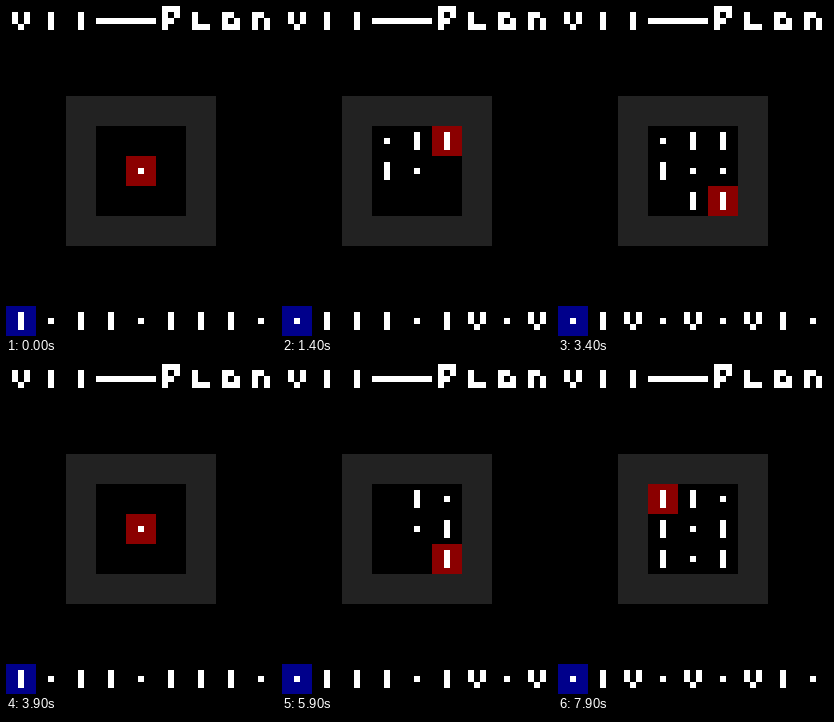
An HTML page with a canvas for the animation above (8400 ms loop, 270x330 px).

```html
<!DOCTYPE html>
<html lang="en">
<head>
<meta charset="utf-8">
<title>VII — Plan</title>
<style>
  html, body { margin: 0; width: 100%; height: 100%; overflow: hidden; background: #000; }
  canvas { display: block; }
</style>
</head>
<body>
<canvas id="stage" width="270" height="330" role="img" aria-label="VII — Plan"></canvas>
<script>
const ctx = document.getElementById('stage').getContext('2d');
const CELL = 30, UNIT = 6, LOOP = 8400;

// Glyph rows inside a 5 x 5 unit cell, from the given top row down
const GLYPHS = {
  '.': [2, '  #'],
  'I': [1, '  #', '  #', '  #'],
  'V': [1, ' # #', ' # #', '  #'],
  '-': [2, '#####'],
  'P': [0, ' ###', ' # #', ' ##', ' #'],
  'L': [1, ' #', ' #', ' ###'],
  'a': [1, ' ##', ' # #', ' ###'],
  'n': [1, ' ##', ' # #', ' # #']
};
const TITLE = 'VII--PLan';
const TAPE = 'I.II.III.IV.V.VI.';
const SYMBOLS = '.' + TAPE;

// Cursor routes from the centre: left, up, right, down
const STEPS = { l: [-1, 0], u: [0, -1], r: [1, 0], d: [0, 1] };
const ROUTES = ['lurrddlr', 'urddlluu'];

function box(col, row, size, color) {
  ctx.fillStyle = color;
  ctx.fillRect(col * CELL, row * CELL, size * CELL, size * CELL);
}

function glyph(char, col, row) {
  const [top, ...lines] = GLYPHS[char];
  ctx.fillStyle = '#fff';
  lines.forEach((line, y) => [...line].forEach((dot, x) => {
    if (dot === '#') {
      ctx.fillRect(col * CELL + x * UNIT, row * CELL + (top + y) * UNIT, UNIT, UNIT);
    }
  }));
}

function write(text, row) {
  [...text].forEach((char, col) => glyph(char, col, row));
}

function draw(state) {
  const step = state % 9;
  const route = ROUTES[Math.floor(state / 9)];
  box(0, 0, 11, '#000');
  write(TITLE, 0);
  box(2, 3, 5, '#222');
  box(3, 4, 3, '#000');

  let x = 4, y = 5;
  for (let i = 0; i <= step; i++) {
    if (i > 0) {
      const [dx, dy] = STEPS[route[i - 1]];
      x += dx;
      y += dy;
    }
    if (i === step) box(x, y, 1, '#8b0000');
    glyph(SYMBOLS[i], x, y);
  }

  box(0, 10, 1, '#00008b');
  write(TAPE.slice(step, step + 9), 10);
}

// Two quick states, then one every half second
function stateAt(t) {
  return t < 400 ? Math.floor(t / 200) : 2 + Math.floor((t - 400) / 500);
}

const start = performance.now();
function frame() {
  draw(stateAt((performance.now() - start) % LOOP));
  requestAnimationFrame(frame);
}
frame();
</script>
</body>
</html>
```
